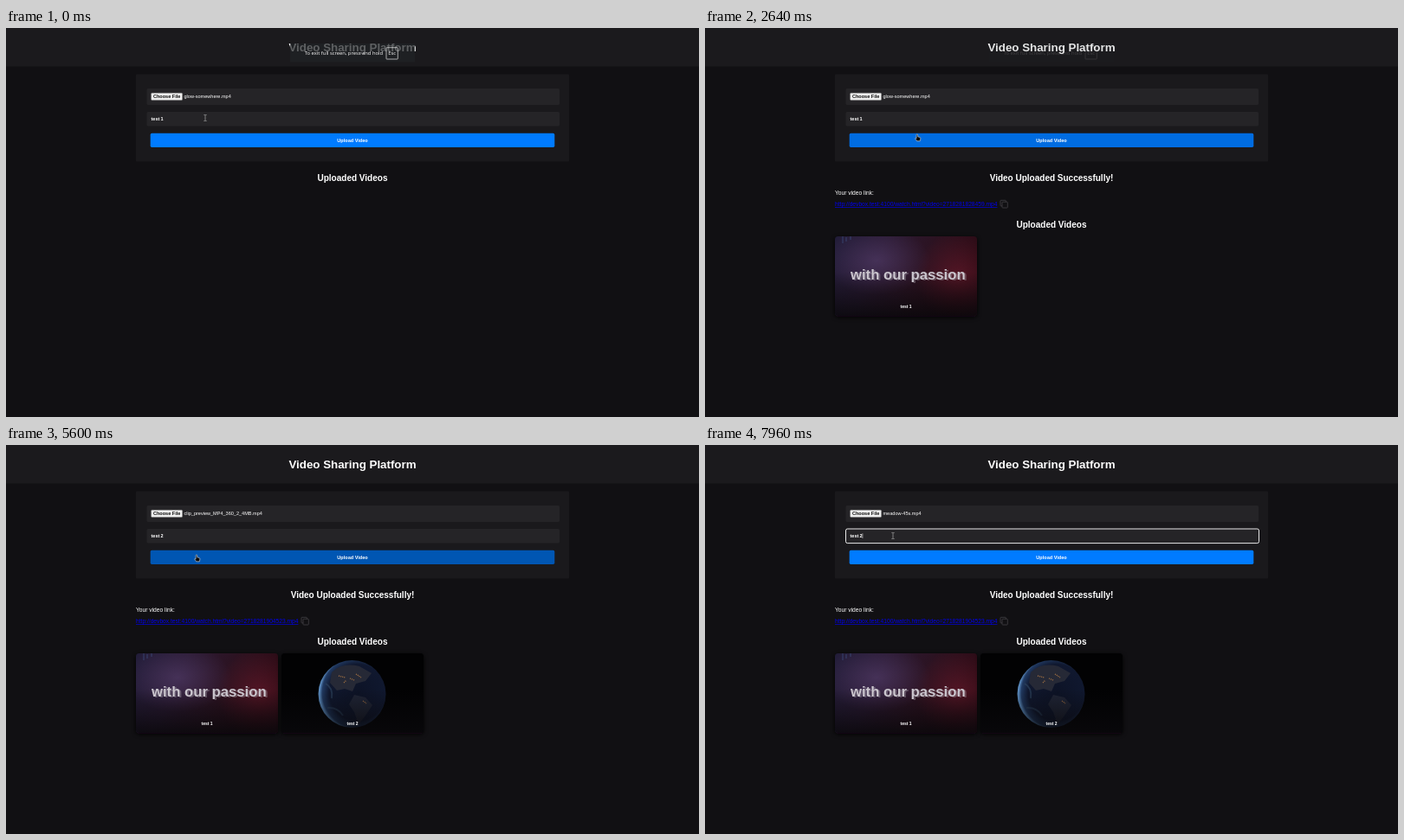
Animation, 800 px wide and 450 px high, one loop 8000 ms. Source, as an HTML page:

```html
<!DOCTYPE html>
<html lang="en">
<head>
<meta charset="utf-8">
<title>Video Sharing Platform</title>
<style>
html, body { margin: 0; height: 100%; overflow: hidden; background: #111013; }
svg { display: block; width: 100vw; height: 100vh; }
text { fill: #fff; font: 5.55px "Liberation Sans", Arial, sans-serif; white-space: pre; }
.bold { font-weight: 700; }
.mid { text-anchor: middle; }
.h1 { font-size: 13.33px; font-weight: 700; }
.h2 { font-size: 10px; font-weight: 700; }
.body { font-size: 6.67px; }
.link { fill: #0000ee; text-decoration: underline; }
.ui text { font: 5px "Open Sans", "Noto Sans", sans-serif; fill: #e8e8e8; }
.ui .key { font-size: 5.85px; fill: #fff; }
.line { fill: none; stroke: #c8c8c8; stroke-width: .6; }

/* One loop is 8 s, so 1% is 80 ms */
.step { animation: 8s step-end infinite; }
.ease { animation: 8s linear infinite; }

#nameA { animation-name: nameA; }
#nameB { animation-name: nameB; }
#nameC { animation-name: nameC; }
@keyframes nameA { 0% { opacity: 1 } 51%, 100% { opacity: 0 } }
@keyframes nameB { 0% { opacity: 0 } 51% { opacity: 1 } 95%, 100% { opacity: 0 } }
@keyframes nameC { 0% { opacity: 0 } 95%, 100% { opacity: 1 } }

#digit1 { animation-name: digit1; }
#digit2 { animation-name: digit2; }
@keyframes digit1 { 0% { opacity: 1 } 59%, 100% { opacity: 0 } }
@keyframes digit2 { 0% { opacity: 0 } 62%, 100% { opacity: 1 } }

#focus { animation-name: focus; }
@keyframes focus { 0% { opacity: 0 } 56% { opacity: 1 } 64.5% { opacity: 0 } 98.8%, 100% { opacity: 1 } }

#choose { animation-name: choose; }
@keyframes choose {
  0% { fill: #efefef } 4% { fill: #dedede } 8% { fill: #efefef }
  40.5% { fill: #dedede } 45% { fill: #efefef }
  84.5% { fill: #dedede } 89%, 100% { fill: #efefef }
}

#upload { animation-name: upload; }
@keyframes upload {
  0%, 20.5% { fill: #007bff } 23%, 31.8% { fill: #0056b3 } 33.8%, 63.5% { fill: #007bff }
  66%, 75% { fill: #0056b3 } 77.5%, 100% { fill: #007bff }
}

#first { animation-name: first; }
#second { animation-name: second; }
#listTitle { animation-name: listTitle; }
@keyframes first { 0% { opacity: 0 } 25%, 100% { opacity: 1 } }
@keyframes second { 0% { opacity: 0 } 68%, 100% { opacity: 1 } }
@keyframes listTitle { 0% { transform: none } 25%, 100% { transform: translateY(54px) } }
#linkA { animation-name: linkA; }
@keyframes linkA { 0% { opacity: 1 } 68%, 100% { opacity: 0 } }

#toast { animation-name: toast; }
@keyframes toast { 0%, 30.5% { opacity: 1 } 33.5%, 100% { opacity: 0 } }

#dialog { animation-name: dialog; transform-origin: 200px 96px; }
@keyframes dialog {
  0%, 6%, 19.5%, 43%, 52.5%, 86.5%, 96.5%, 100% { opacity: 0; transform: scale(.97) }
  8%, 17.5%, 45%, 50.5%, 88.5%, 94.5% { opacity: 1; transform: scale(1.01) }
}
#pickA { animation-name: pickA; }
#pickB { animation-name: pickB; }
#pickC { animation-name: pickC; }
@keyframes pickA { 0% { opacity: 0 } 13.5% { opacity: 1 } 25%, 100% { opacity: 0 } }
@keyframes pickB { 0% { opacity: 0 } 48.5% { opacity: 1 } 56%, 100% { opacity: 0 } }
@keyframes pickC { 0% { opacity: 0 } 91.5% { opacity: 1 } 100% { opacity: 1 } }

#cursor { animation-name: path; }
@keyframes path {
  0% { transform: translate(230px, 104px) }
  1% { transform: translate(228px, 102px) }
  4%, 7% { transform: translate(190px, 80px) }
  14%, 18% { transform: translate(110px, 81px) }
  21% { transform: translate(240px, 128px) }
  25%, 32% { transform: translate(246px, 128px) }
  33% { transform: translate(245px, 123px) }
  38% { transform: translate(200px, 95px) }
  41%, 45% { transform: translate(188px, 80px) }
  49%, 51% { transform: translate(145px, 81px) }
  54% { transform: translate(180px, 102px) }
  57%, 62% { transform: translate(181px, 105px) }
  65% { transform: translate(219px, 127px) }
  70% { transform: translate(220px, 127px) }
  74.5% { transform: translate(222px, 128px) }
  77% { transform: translate(230px, 158px) }
  80% { transform: translate(226px, 150px) }
  85.5% { transform: translate(203.5px, 88.5px) }
  86.5%, 88.5% { transform: translate(195px, 80px) }
  92%, 95% { transform: translate(188px, 81px) }
  98% { transform: translate(216px, 103px) }
  99.5%, 100% { transform: translate(217px, 105px) }
}
#arrow { animation-name: arrow; }
#beam { animation-name: beam; }
#hand { animation-name: hand; }
@keyframes arrow {
  0% { opacity: 0 } 2% { opacity: 1 } 20.5% { opacity: 0 } 33.2% { opacity: 1 } 53% { opacity: 0 }
  62.5% { opacity: 1 } 63.5% { opacity: 0 } 75% { opacity: 1 } 98%, 100% { opacity: 0 }
}
@keyframes beam { 0% { opacity: 1 } 2% { opacity: 0 } 53% { opacity: 1 } 62.5% { opacity: 0 } 98%, 100% { opacity: 1 } }
@keyframes hand { 0% { opacity: 0 } 20.5% { opacity: 1 } 33.2% { opacity: 0 } 63.5% { opacity: 1 } 75%, 100% { opacity: 0 } }
</style>
</head>
<body>
<svg viewBox="0 0 800 450">
  <defs>
    <linearGradient id="haze" x2="1" y2=".25">
      <stop stop-color="#211c38"/><stop offset=".35" stop-color="#2a1a33"/>
      <stop offset=".7" stop-color="#2c1220"/><stop offset="1" stop-color="#2a0a14"/>
    </linearGradient>
    <radialGradient id="violet"><stop stop-color="#57406f" stop-opacity=".6"/><stop offset="1" stop-color="#57406f" stop-opacity="0"/></radialGradient>
    <radialGradient id="red"><stop stop-color="#6e1c2e" stop-opacity=".6"/><stop offset="1" stop-color="#6e1c2e" stop-opacity="0"/></radialGradient>
    <linearGradient id="shade" x2="0" y2="1">
      <stop offset=".45" stop-color="#09080b" stop-opacity="0"/><stop offset="1" stop-color="#09080b" stop-opacity=".85"/>
    </linearGradient>
    <radialGradient id="globe" cx=".58" cy=".48" r=".56">
      <stop stop-color="#0d1326"/><stop offset=".75" stop-color="#10182f"/>
      <stop offset=".93" stop-color="#213a62"/><stop offset="1" stop-color="#5b8cc0"/>
    </radialGradient>
    <filter id="soft" x="-20%" y="-20%" width="140%" height="150%"><feGaussianBlur stdDeviation="2.5"/></filter>
    <clipPath id="cardClip"><rect width="164" height="92" rx="3.5"/></clipPath>
    <clipPath id="globeClip"><circle cx="81.5" cy="47" r="39"/></clipPath>
    <path id="folder" d="M0 .5h2.5l1 1h3.3v4.7H0z" fill="#d9c074"/>
    <g id="film">
      <rect width="37" height="23" fill="#0a0a0a"/>
      <path d="M1.8 1.2V23M35.2 1.2V23" stroke="#cfcfcf" stroke-width="1.7" stroke-dasharray="1.7 1.5"/>
    </g>
  </defs>

  <rect width="800" height="450" fill="#111013"/>
  <rect width="800" height="44.5" fill="#1b1a1d"/>
  <text class="h1 mid" x="400" y="27">Video Sharing Platform</text>

  <rect x="150" y="53.5" width="500" height="101" rx="1" fill="#1a191c"/>
  <g fill="#252427">
    <rect x="162.5" y="70" width="476.5" height="19" rx="1.7"/>
    <rect x="162.5" y="97" width="476.5" height="16.5" rx="1.7"/>
  </g>
  <rect id="choose" class="step" x="167.6" y="75.2" width="36" height="8.4" rx="1" stroke="#777" stroke-width=".4"/>
  <text class="bold mid" x="185.6" y="81.4" style="fill:#111">Choose File</text>
  <g class="bold">
    <text id="nameA" class="step" x="205.5" y="81.4">glow-somewhere.mp4</text>
    <text id="nameB" class="step" x="205.5" y="81.4">clip_preview_MP4_360_2_4MB.mp4</text>
    <text id="nameC" class="step" x="205.5" y="81.4">meadow-45s.mp4</text>
    <text class="bold" x="167.5" y="107">test <tspan id="slot"></tspan></text>
    <text id="digit1" class="step bold" x="178.5" y="107">1</text>
    <text id="digit2" class="step bold" x="178.5" y="107">2</text>
  </g>
  <g id="focus" class="step">
    <rect x="162.5" y="97" width="477" height="16.6" rx="2" fill="none" stroke="#fff" stroke-width=".9"/>
    <path d="M181.9 102.2v5.8" stroke="#fff" stroke-width=".5"/>
  </g>
  <rect id="upload" class="ease" x="166.7" y="121.8" width="466.6" height="16.2" rx="1.7"/>
  <text class="bold mid" x="400" y="131.8">Upload Video</text>

  <text id="listTitle" class="step h2 mid" x="400" y="176.5">Uploaded Videos</text>

  <g id="first" class="step">
    <text class="h2 mid" x="400" y="176.5">Video Uploaded Successfully!</text>
    <text class="body" x="150" y="193">Your video link:</text>
    <text id="linkA" class="step body link" x="150" y="206">http://devbox.test:4100/watch.html?video=2718281828459.mp4</text>
    <g id="second-link"><text id="linkB" class="body link" x="150" y="206" style="animation:second 8s step-end infinite">http://devbox.test:4100/watch.html?video=2718281904523.mp4</text></g>
    <g fill="#111013" stroke="#4b4a4e" stroke-width=".7">
      <rect x="341" y="199.3" width="6.3" height="6.6" rx=".7"/>
      <rect x="343" y="201.2" width="6.3" height="6.8" rx=".7"/>
    </g>
    <g transform="translate(150 241)">
      <rect y="1.5" width="164" height="92" rx="4" fill="#070608" filter="url(#soft)"/>
      <g clip-path="url(#cardClip)">
        <rect width="164" height="92" fill="url(#haze)"/>
        <ellipse cx="48" cy="28" rx="62" ry="40" fill="url(#violet)"/>
        <ellipse cx="142" cy="46" rx="48" ry="52" fill="url(#red)"/>
        <path d="M9 0v8M13 1v5M18 0v4" stroke="#4864a0" stroke-width="1" opacity=".5"/>
        <rect width="164" height="92" fill="url(#shade)"/>
        <text class="bold" x="20" y="50.8" style="font-size:16.7px;fill:#bbb5bf;opacity:.35">with our passion</text>
        <text class="bold" x="18" y="50" style="font-size:16.7px;fill:#cbc6ce">with our passion</text>
      </g>
      <text class="mid bold" x="82" y="83" style="font-size:5px">test 1</text>
    </g>
  </g>

  <g id="second" class="step">
    <g transform="translate(318 241)">
      <rect y="1.5" width="164" height="92" rx="4" fill="#070608" filter="url(#soft)"/>
      <g clip-path="url(#cardClip)">
        <rect width="164" height="92" fill="#020203"/>
        <circle cx="81.5" cy="47" r="39" fill="url(#globe)"/>
        <g clip-path="url(#globeClip)">
          <path d="M58 22q12-12 32-7l14 8-7 9-11 3-4 9-9-3-9 2-8-9z" fill="#262936"/>
          <path d="M84 48l13 3 8 9-8 12-8 10-5-14-6-9z" fill="#202536"/>
          <path d="M66 26l8 2M79 29l5 2M72 34l3-3M86 24l6 4M94 55l4 3" stroke="#9a6c42" stroke-width="1.3" stroke-dasharray="1.2 .9"/>
          <path d="M51 35q9 5 7 17M53 63q12-1 18 9" fill="none" stroke="#304762" stroke-width="2" opacity=".6"/>
        </g>
        <rect width="164" height="92" fill="url(#shade)"/>
      </g>
      <text class="mid bold" x="82" y="83" style="font-size:5px">test 2</text>
    </g>
  </g>

  <g id="dialog" class="ease ui">
    <rect x="5" y="2" width="390" height="191" rx="3" fill="#000" opacity=".5" filter="url(#soft)"/>
    <rect x="5.2" y=".5" width="388.8" height="191.5" rx="2.5" fill="#1c1c1c" stroke="#444" stroke-width=".5"/>
    <path d="M5.5 158.5h388.2v31q0 2.2-2.2 2.2H7.7q-2.2 0-2.2-2.2z" fill="#2e2e2e"/>
    <text x="9.5" y="9.3">Open</text>
    <path class="line" d="M386.2 5.8l3.6 3.6m0-3.6l-3.6 3.6"/>
    <path class="line" d="M17 25h-5m2-2l-2 2 2 2M25.500 25h5m-2-2l2 2-2 2M39.600 24.200l1.600 1.600 1.600-1.600M53 27.500v-5m-2 2l2-2 2 2"/>
    <g fill="#232323" stroke="#3d3d3d" stroke-width=".5">
      <rect x="62" y="18" width="239" height="14" rx="1"/>
      <rect x="306" y="18" width="85" height="14" rx="1"/>
    </g>
    <use href="#folder" x="65.500" y="21.700"/>
    <path class="line" d="M75 23.500l1.500 1.500-1.500 1.500M101 23.500l1.500 1.500-1.500 1.500M134 23.500l1.500 1.500-1.500 1.500M276.400 24.300l1.600 1.600 1.600-1.600M294.700 23.800a2.100 2.100 0 1 0 .2 2m-.1-3.400v1.600h-1.600"/>
    <text x="81" y="26.800">This PC</text>
    <text x="106" y="26.800">DYSK 2 (D:)</text>
    <text x="140" y="26.800">SampleVids</text>
    <text x="310" y="26.800" style="fill:#888">Search SampleVids</text>
    <text x="13" y="44.300">Organize</text>
    <text x="51" y="44.300">New folder</text>
    <path d="M34.500 41.800h3.400l-1.700 1.900zM354.300 41.800h3.400l-1.700 1.900z" fill="#c8c8c8"/>
    <path d="M5.500 48.500h388" stroke="#343434" stroke-width=".5"/>
    <rect x="344.300" y="40" width="6" height="5.500" fill="#555" stroke="#ddd" stroke-width=".8"/>
    <path d="M366.300 40h6.400v5.500h-6.400z" fill="#d4d4d4"/><path d="M369.500 40.500h2.800v4.500h-2.800z" fill="#3c8f98"/>
    <circle cx="384.300" cy="42.800" r="3.200" fill="#2d8fd5"/>

    <use href="#folder" x="19.500" y="52.800"/><text x="28" y="57.500">public</text>
    <use href="#folder" x="19.500" y="66"/><text x="28" y="70.700">portfolio2</text>
    <use href="#folder" x="19.500" y="79.200"/><text x="28" y="84">SampleVids</text>
    <path d="M9 95.500h52M71 49v109" stroke="#3c3c3c" stroke-width=".5"/>
    <rect x="7" y="128" width="56" height="13" rx="1" fill="#363636"/>
    <path class="line" d="M11 107.500l1.500 1.500 1.500-1.500M15 120l1.500 1.500-1.500 1.500M15 133l1.500 1.500-1.500 1.500M11.500 146.400l1.500 1.500-1.500 1.500"/>
    <path d="M19.500 105.500h7v4.500h-7zm2 5.200h3v1h-3zM19.500 145.500h6.500v4h-6.500zm2 4.800h2.500v1h-2.500z" fill="#4da3d8"/>
    <path d="M23 121.500h6v2.500h-6zM23 134h6v2.200h-6z" fill="#b8b8b8"/>
    <rect x="23" y="118.500" width="2.500" height="2.500" fill="#3d9ee0"/>
    <text x="28" y="110.300">This PC</text>
    <text x="31" y="123.300">Storage (C:)</text>
    <text x="31" y="136.300">DYSK 2 (D:)</text>
    <text x="28" y="149.600">Network</text>
    <path d="M66.500 107v35" stroke="#969696" stroke-width=".8"/>

    <rect x="83" y="162.300" width="222" height="9.700" fill="#383838" stroke="#a0a0a0" stroke-width=".6"/>
    <g id="pickA" class="step">
      <rect x="77.300" y="52" width="42.800" height="53.200" fill="#4c4c4c" stroke="#777" stroke-width=".6"/>
      <text x="85" y="169">glow-somewhere.mp4</text>
    </g>
    <g id="pickB" class="step">
      <rect x="122.300" y="52" width="42.800" height="59" fill="#4c4c4c" stroke="#777" stroke-width=".6"/>
      <text x="85" y="169">clip_preview_MP4_360_2_4MB.mp4</text>
    </g>
    <g id="pickC" class="step">
      <rect x="167.300" y="52" width="42.800" height="48" fill="#4c4c4c" stroke="#777" stroke-width=".6"/>
      <text x="85" y="169">meadow-45s.mp4</text>
    </g>

    <g transform="translate(80 67.500)">
      <use href="#film"/><rect x="3.500" width="30" height="23" fill="#24110f"/>
      <ellipse cx="25" cy="12" rx="8" ry="10" fill="url(#red)"/>
      <text class="bold" x="3.600" y="12.300" style="font-size:6.200px;font-weight:700">glow</text>
    </g>
    <g transform="translate(125 67.500)">
      <use href="#film"/><rect x="3.500" width="30" height="23" fill="#05060b"/>
      <circle cx="18.500" cy="11.500" r="9.500" fill="url(#globe)"/>
    </g>
    <g transform="translate(170 67.500)">
      <use href="#film"/><rect x="3.500" width="30" height="23" fill="#3f7a38"/>
      <path d="M3.500 0h30v7l-9 3-8-4-7 5-6-2z" fill="#55904c"/>
      <path d="M3.500 18l9-3 8 2 13-3v9h-30z" fill="#78a868"/>
      <path d="M10 2v13M20 0v16M28 3v11" stroke="#274f27" stroke-width="1.500"/>
    </g>
    <g fill="#2d8fd5">
      <rect x="113" y="68" width="3.500" height="4"/><rect x="158" y="68" width="3.500" height="4"/><rect x="203" y="68" width="3.500" height="4"/>
    </g>
    <g class="mid">
      <text x="98.700" y="97">glow-somewhere.</text><text x="98.700" y="103">mp4</text>
      <text x="143.700" y="97">clip_preview_MP</text><text x="143.700" y="103">4_360_2_4MB.mp</text><text x="143.700" y="109">4</text>
      <text x="188.700" y="97">meadow-45s.mp4</text>
    </g>

    <text x="59" y="169">File name:</text>
    <rect x="309" y="162.300" width="78" height="9.700" fill="#383838" stroke="#666" stroke-width=".5"/>
    <text x="311" y="169">Video Files (*.ogm;*.wmv;*.mp</text>
    <path class="line" d="M299.500 166.700l1.400 1.400 1.400-1.400M382 166.700l1.400 1.400 1.400-1.400"/>
    <rect x="310" y="175" width="35" height="9.500" rx="1.200" fill="#383838" stroke="#c4c4c4" stroke-width=".6"/>
    <rect x="351" y="175" width="35" height="9.500" rx="1.200" fill="#383838" stroke="#666" stroke-width=".6"/>
    <g class="mid"><text x="327.500" y="181.500">Open</text><text x="368.500" y="181.500">Cancel</text></g>
    <path d="M389.500 190.500l3-3M391.300 190.700l1.300-1.300" stroke="#aaa" stroke-width=".7"/>
  </g>

  <g id="toast" class="ease ui">
    <rect x="328" y="18" width="144" height="21.500" fill="#202326" opacity=".72"/>
    <text class="key" x="344.700" y="31.400">To exit full screen, press and hold</text>
    <rect x="439" y="22.700" width="13.300" height="13.300" rx=".6" fill="none" stroke="#e8e8e8" stroke-width=".7"/>
    <text class="key mid" x="445.600" y="31.400">Esc</text>
  </g>

  <g id="cursor" class="ease">
    <path id="arrow" class="step" d="M0 0v8l2.200-1.600h3.200z" fill="#0b0b0b" stroke="#fff" stroke-width=".8" stroke-linejoin="round"/>
    <path id="beam" class="step" d="M-1.600-3.500h1.300l.3.300.3-.3h1.300M0-3.200v6.400M-1.600 3.500h1.300l.3-.3.3.3h1.300" fill="none" stroke="#9b9b9b" stroke-width=".8"/>
    <path id="hand" class="step" d="M-.3 0q.9-.2 1 .8v2l2.400.7q1 .4.800 1.500l-.6 2.800h-3.600l-2.100-3q.4-.9 1.500 0l0-4q0-.7.600-.8z" fill="#050505" stroke="#e6e6e6" stroke-width=".6" stroke-linejoin="round"/>
  </g>
</svg>
</body>
</html>
```
